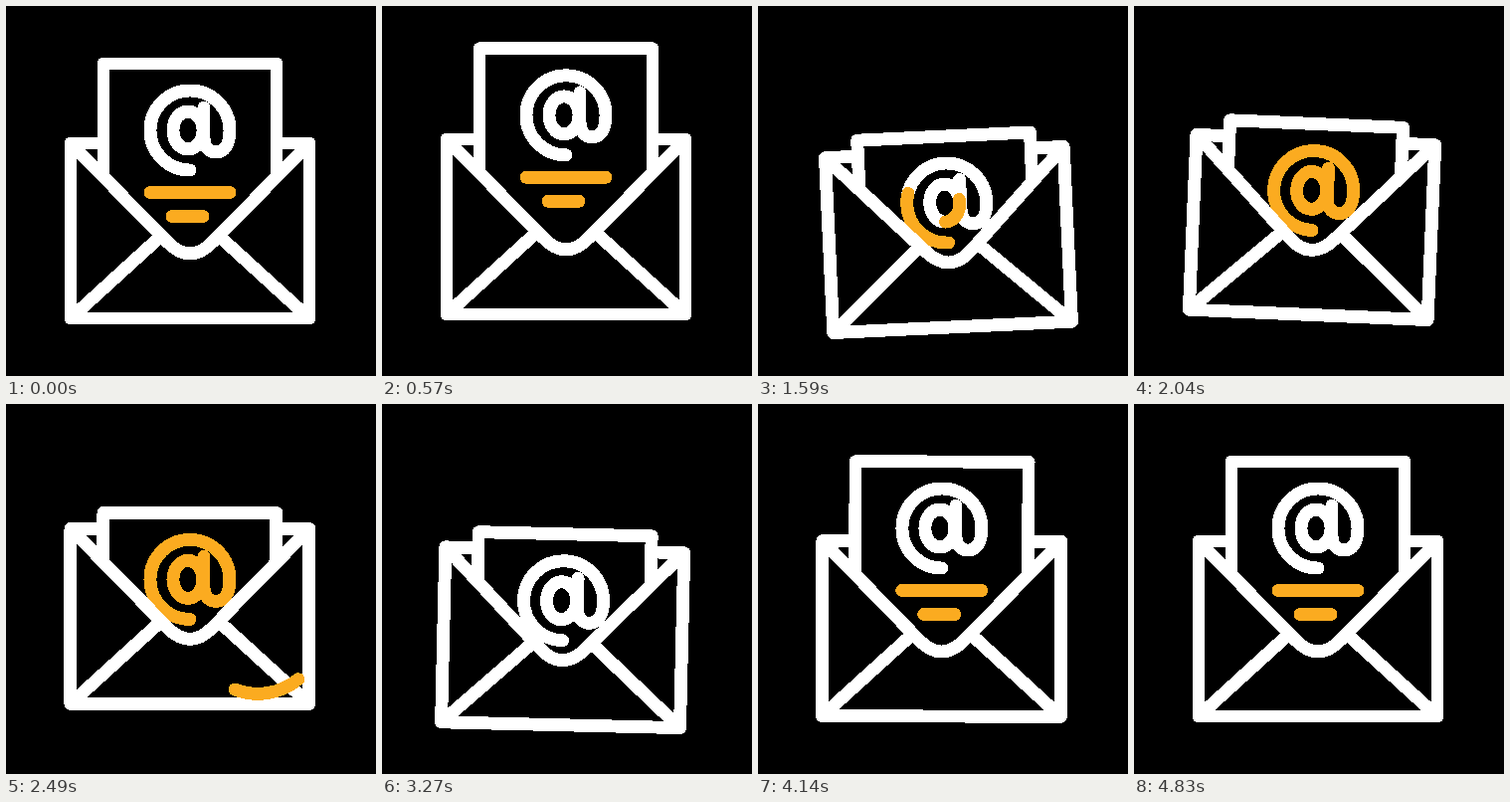
These frames come from a looping animation (372x372 px, 5.31 s). An HTML page:

```html
<!DOCTYPE html>
<html lang="en">
<head>
<meta charset="utf-8">
<title>Envelope</title>
<style>
html, body { margin: 0; width: 100%; height: 100%; overflow: hidden; background: #000; }
svg { display: block; width: 100vw; height: 100vh; shape-rendering: crispEdges; }
.ink { fill: none; stroke: #fff; stroke-width: 12.9; stroke-linecap: round; stroke-linejoin: round; }
.accent { stroke: #fbab20; }
</style>
</head>
<body>
<svg viewBox="0 0 372 372">
  <defs>
    <clipPath id="pocket">
      <path d="M65 138L162 237Q185 261 208 237L305 138V-100H65Z"/>
    </clipPath>
  </defs>
  <g id="mail" class="ink">
    <path d="M65 138H305V314H65Z"/>
    <g clip-path="url(#pocket)">
      <g id="letter">
        <path d="M98 320V58H272V320" fill="#000"/>
        <path d="M185 165A40 40 0 1 1 225 125C225 140 219 147 211 147C204 147 199 141 199 132V102"/>
        <path d="M183 144A15 19 0 0 0 183 106A15 19 0 0 0 183 144"/>
        <path class="accent sign" d="M185 165A40 40 0 1 1 225 125C225 140 219 147 211 147C204 147 199 141 199 132V102"/>
        <path class="accent sign" d="M183 144A15 19 0 0 0 183 106A15 19 0 0 0 183 144"/>
        <path class="accent" d="M145 187.5H225M167 211.5H198"/>
      </g>
    </g>
    <path d="M65 138L162 237Q185 261 208 237L305 138M65 314L154 233M305 314L216 233"/>
  </g>
  <g class="ink accent">
    <path id="swooshL" d="M44 211A68 68 0 0 0 141 267.5"/>
    <path id="swooshR" d="M317 232A64 64 0 0 1 230 287"/>
    <path class="spark" d="M62 104L44 82"/>
    <path class="spark" d="M56 126H32"/>
    <path class="spark" d="M308 104L322 82"/>
    <path class="spark" d="M314 126H328"/>
  </g>
</svg>
<script>
const LOOP = 5310, STEP = 30;
const $ = id => document.getElementById(id);
const all = sel => [...document.querySelectorAll(sel)];
const mail = $('mail'), letter = $('letter');
const signs = all('.sign'), sparks = all('.spark');

// [time, value] keys
const TILT = [[833, 0], [1500, -3], [2160, 3], [2825, -3], [3500, 3], [4240, 0]];
const LIFT = [[333, 0], [1000, -14], [1715, 11], [2333, -16], [3040, 11], [3830, 0]];
const SLIDE = [[333, 0], [667, -14], [1315, 64], [3333, 64], [4040, 0]];

function ease(t, a, b) {
  const p = Math.min(1, Math.max(0, (t - a) / (b - a)));
  return p * p * (3 - 2 * p);
}

function track(keys, t) {
  let v = keys[0][1];
  for (let i = 1; i < keys.length; i++) {
    const [a, from] = keys[i - 1], [b, to] = keys[i];
    v += (to - from) * ease(t, a, b);
  }
  return v;
}

// Shows the part of a path between the fractions a and b
function trim(el, a, b) {
  const len = el.getTotalLength();
  el.style.display = b - a > 0.001 ? '' : 'none';
  el.setAttribute('stroke-dasharray', `${(b - a) * len} ${len * 2}`);
  el.setAttribute('stroke-dashoffset', -a * len);
}

function draw(t) {
  const tilt = track(TILT, t);
  const x = -2.4 * tilt, y = track(LIFT, t);
  mail.setAttribute('transform', `translate(${x} ${y}) rotate(${tilt} 185 226)`);
  letter.setAttribute('transform', `translate(0 ${track(SLIDE, t)})`);

  signs.forEach(el => trim(el, ease(t, 2580, 3250), ease(t, 1360, 2025)));
  trim($('swooshL'), ease(t, 1000, 1330), ease(t, 730, 1060));
  trim($('swooshR'), ease(t, 2340, 2670), ease(t, 2070, 2400));
  sparks.forEach(el => trim(el, ease(t, 4500, 4830), ease(t, 4230, 4560)));
}

function tick() {
  const t = performance.now() % LOOP;
  draw(Math.floor(t / STEP) * STEP);
  requestAnimationFrame(tick);
}
tick();
</script>
</body>
</html>
```
